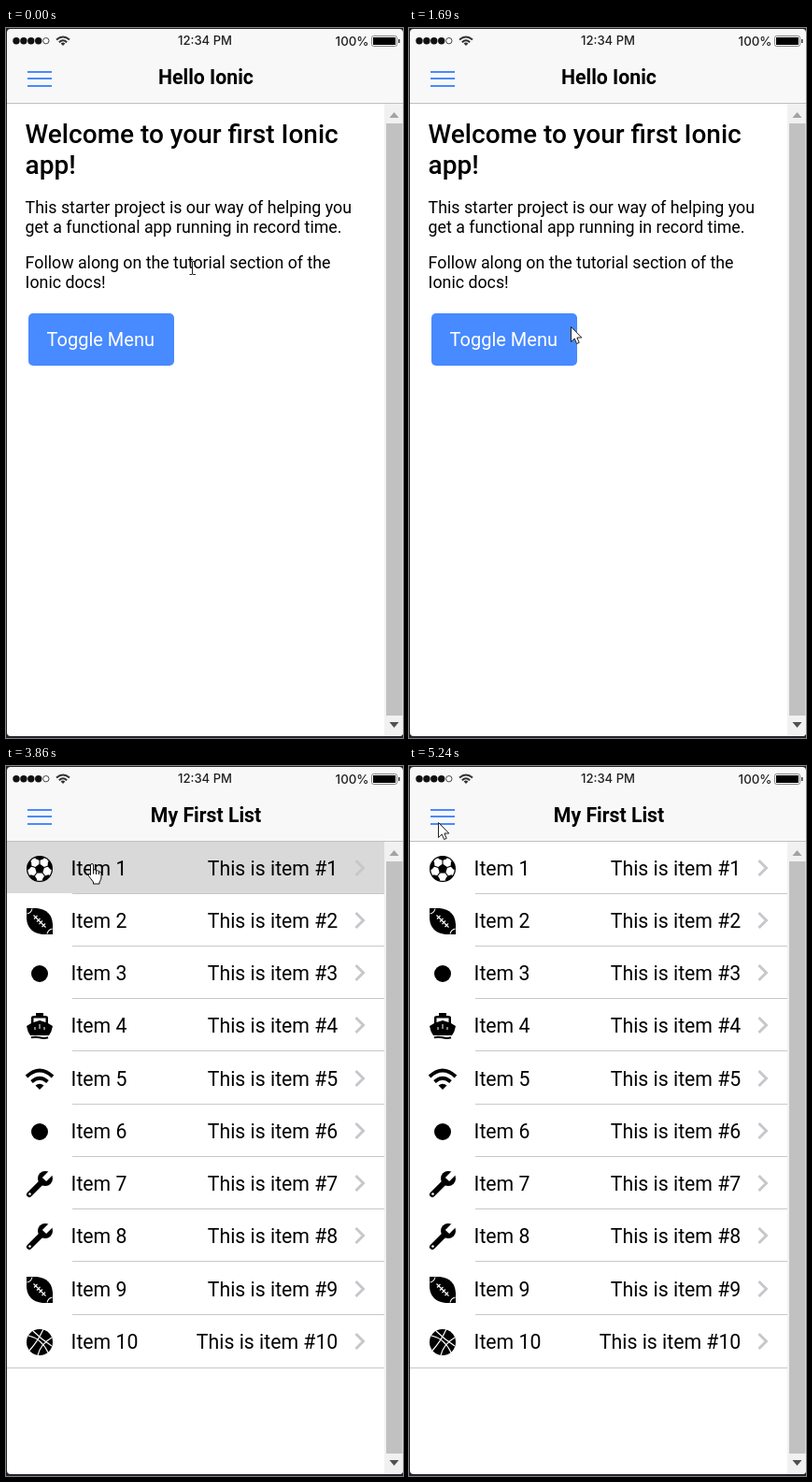
An HTML page with a canvas for the animation above (5320 ms loop, 425 by 759 pixels).

```html
<!DOCTYPE html>
<html lang="en">
<head>
<meta charset="utf-8">
<title>App menu and list</title>
<style>
html, body { margin: 0; width: 100%; height: 100%; overflow: hidden; background: #25222b; }
canvas { display: block; }
</style>
</head>
<body>
<canvas id="stage" width="425" height="759"></canvas>
<script>
const c = document.getElementById('stage').getContext('2d');
const LOOP = 5320, STEP = 77.1, BLUE = '#488aff', LINE = '#c8c7cc';

// CSS-style cubic bezier easing, solved by bisection
function bezier(x1, y1, x2, y2) {
  const at = (a, b, s) => 3 * s * (1 - s) ** 2 * a + 3 * s * s * (1 - s) * b + s ** 3;
  return x => {
    if (x <= 0) return 0;
    if (x >= 1) return 1;
    let lo = 0, hi = 1;
    for (let i = 0; i < 24; i++) {
      const mid = (lo + hi) / 2;
      if (at(x1, x2, mid) < x) lo = mid; else hi = mid;
    }
    return at(y1, y2, lo);
  };
}
const ease = bezier(.25, .1, .25, 1), navEase = bezier(.36, .66, .04, 1);

function text(str, x, y, size, weight = 400, color = '#000', align = 'left', font = 'Roboto') {
  c.font = `${weight} ${size}px ${font}, sans-serif`;
  c.fillStyle = color;
  c.textAlign = align;
  c.fillText(str, x, y);
}
function rect(x, y, w, h, color) {
  c.fillStyle = color;
  c.fillRect(x, y, w, h);
}
function shape(d, fill, stroke, width = 1) {
  const p = new Path2D(d);
  if (fill) { c.fillStyle = fill; c.fill(p); }
  if (stroke) { c.strokeStyle = stroke; c.lineWidth = width; c.stroke(p); }
}
function disc(x, y, r, color) {
  c.beginPath();
  c.arc(x, y, r, 0, 7);
  c.fillStyle = color;
  c.fill();
}
function at(x, y, draw, alpha = 1) {
  c.save();
  c.translate(x, y);
  c.globalAlpha *= alpha;
  draw();
  c.restore();
}

// Icons, centred on the origin
const icons = {
  soccer() {
    disc(0, 0, 14, '#000');
    disc(0, 0, 12.7, '#fff');
    shape('M0 -5.4L5.1 -1.7L3.2 4.4H-3.2L-5.1 -1.7Z', '#000');
    c.beginPath();
    c.arc(0, 0, 13.5, 0, 7);
    c.clip();
    for (let i = 0; i < 5; i++) {
      shape('M0 -9L4.4 -10.8L5 -14H-5L-4.4 -10.8Z', '#000');
      shape('M0 -5V-9.5', null, '#000', 1.1);
      c.rotate(Math.PI * .4);
    }
  },
  football() {
    shape('M-14 -14H-3Q13 -12 14 3V14H3Q-13 12 -14 -3Z', '#000');
    shape('M-6.5 -6.5L6.5 6.5M-6 -2.5L-2.5 -6M-3 .5L.5 -3M-.5 3L3 -.5M2.5 6L6 2.5M-13.5 -8Q-9 -9 -8 -13.5M13.5 8Q9 9 8 13.5',
      null, '#fff', 1.1);
  },
  dot() { disc(0, 0, 9, '#000'); },
  boat() {
    shape('M-9 -3V-9Q-9 -11 -6 -11H-4V-14H4V-11H6Q9 -11 9 -9V-3L14 0Q13 6 10 10H-10Q-13 6 -14 0Z', '#000');
    shape('M-6.5 -4V-8.5H6.5V-4L0 -6Z', '#fff');
    shape('M0 -2V3M-5 1V4M5 1V4', null, '#fff');
    shape('M-9 12.3Q-4.5 11 0 12.3Q4.5 13.6 9 12.3', null, '#000', 2);
  },
  wifi() {
    shape('M-14 -3Q0 -16 14 -3M-8.5 2.5Q0 -5 8.5 2.5', null, '#000', 3.8);
    shape('M-4.5 6.5Q0 3 4.5 6.5L0 11Z', '#000');
  },
  wrench() {
    c.lineCap = 'round';
    shape('M-11 11L4 -4', null, '#000', 6);
    disc(6, -6, 8, '#000');
    c.lineCap = 'butt';
    shape('M5 -5L15 -15', null, '#fff', 6);
    disc(-10.5, 10.5, 1.3, '#fff');
  },
  basketball() {
    disc(0, 0, 14, '#000');
    shape('M-12 -7Q2 -4 9 11M-7 -12Q2 -3 13 4M-11 9Q-2 -1 4 -14M-2 14Q1 2 13 -5', null, '#fff', 1.2);
  }
};
const rows = ['soccer', 'football', 'dot', 'boat', 'wifi', 'dot', 'wrench', 'wrench', 'football', 'basketball'];

function chevron(x, y) {
  at(x, y, () => shape('M-4 -8L4 0L-4 8', null, '#c7c7cc', 3));
}
function scrollbar(x) {
  rect(x, 81, 20, 676, '#f1f1f1');
  rect(x + 2, 102, 17.5, 633, '#c1c1c1');
  at(x + 10.5, 93, () => shape('M-5 3L0 -3L5 3Z', '#a3a3a3'));
  at(x + 10.5, 745, () => shape('M-5 -3L0 3L5 -3Z', '#505050'));
}
function headerBar(width) {
  rect(1, 1, width, 79, '#f8f8f8');
  rect(1, 80, width, 1, '#c0c0c0');
}
function title(str, x) { text(str, x, 60, 21.25, 700, '#000', 'center'); }
function burger() {
  for (const y of [46, 53, 61]) rect(23, y, 26, 2, BLUE);
}

function menu(picked) {
  rect(1, 1, 424, 756, '#fff');
  headerBar(424);
  title('Pages', 166);
  if (picked) rect(1, 135, 310, 55, '#f4f4f4');
  ['Hello Ionic', 'My First List'].forEach((label, i) => {
    text(label, 20.3, 115 + 55 * i, 21.25);
    chevron(284.5, 107.5 + 55 * i);
  });
  rect(21, 134, 290, 1, LINE);
  rect(1, 190, 310, 1, LINE);
  scrollbar(310);
}

function home() {
  rect(1, 81, 424, 676, '#fff');
  text('Welcome to your first Ionic', 20.6, 123, 28, 500);
  text('app!', 20.6, 156, 28, 500);
  const lines = ['This starter project is our way of helping you', 'get a functional app running in record time.',
    'Follow along on the tutorial section of the', 'Ionic docs!'];
  lines.forEach((s, i) => text(s, 20.6, 198 + 21 * i + (i > 1 ? 17 : 0), 17.8));
  c.beginPath();
  c.roundRect(24, 305, 156, 56, 5);
  c.fillStyle = BLUE;
  c.fill();
  text('Toggle Menu', 43.6, 340, 20, 400, '#fff');
  scrollbar(405);
}

function list(pressed) {
  rect(1, 81, 424, 676, '#fff');
  if (pressed) rect(1, 81, 404, 55, '#d9d9d9');
  rows.forEach((icon, i) => {
    const y = 109 + Math.floor(56.25 * i), last = i == rows.length - 1;
    at(36, y + 1, icons[icon]);
    text('Item ' + (i + 1), 69.6, y + 7.5, 21.25);
    text('This is item #' + (i + 1), 355.3, y + 7.5, 21.25, 400, '#000', 'right');
    chevron(378.5, y);
    rect(last ? 1 : 71, last ? 643 : y + 27, 405 - (last ? 1 : 71), 1, LINE);
  });
  scrollbar(405);
}

function details() {
  rect(1, 81, 424, 676, '#fff');
  text('Item 1', 145.5, 130, 28, 500);
  at(247, 118, icons.soccer);
  const lead = 'You navigated here from ';
  text(lead, 28.5, 181, 24.8, 500);
  const w = c.measureText(lead).width;
  text('Item 1', 28.5 + w, 181, 24.8, 700);
  scrollbar(405);
}

// p: 0 shows the list, 1 shows the details
function listAndDetails(p, pressed) {
  const shift = Math.round(424 * (1 - p)), back = Math.round(-140 * p), fade = (1 - p) ** 2;
  at(back, 0, () => list(pressed));
  if (p > 0) {
    rect(1, 81, 424, 676, `rgba(0,0,0,${.2 * p})`);
    at(shift, 0, details);
  }
  headerBar(424);
  at(back, 0, () => title('My First List', 214), fade);
  at(0, 0, burger, fade);
  if (p > 0) {
    at(shift, 0, () => title('Item Details', 214), p);
    at(0, 0, () => {
      shape('M25 41L13 53L25 65', null, BLUE, 3.2);
      text('Back', 35.4 + 125 * (1 - p), 61, 21.25, 400, BLUE);
    }, p);
  }
}

function statusBar() {
  for (let i = 0; i < 4; i++) disc(11 + 7.9 * i, 13.7, 3.7, '#111');
  shape('M46 13.7A3.2 3.2 0 1 1 39.6 13.7A3.2 3.2 0 1 1 46 13.7Z', null, '#333', .9);
  shape('M54 12.5Q61 6.5 68 12.5M56.8 15.2Q61 11.4 65.2 15.2', null, '#333', 2);
  shape('M58.6 16.5Q61 14.6 63.4 16.5L61 19Z', '#333');
  text('12:34 PM', 213, 18, 13.1, 500, '#222', 'center', 'Inter');
  text('100%', 388.5, 18.5, 13.3, 500, '#222', 'right', 'Inter');
  c.beginPath();
  c.roundRect(391.5, 8.5, 27, 11, 2);
  c.strokeStyle = '#888';
  c.lineWidth = 1;
  c.stroke();
  rect(393, 10, 24, 8, '#000');
  rect(420, 12, 1.5, 4, '#333');
}

// Pointer stops: step, x, y
const stops = [[0, 200, 257], [1, 192, 243], [6, 30, 35], [7, 36, 44], [11, 36, 44], [15, 365, 240], [16, 365, 240],
  [22, 173, 319], [25, 118, 337], [28, 118, 337], [31, 99, 227], [34, 61, 142], [43, 61, 142], [48, 90, 104],
  [51, 90, 104], [53, 66, 16], [55, 53, 78], [59, 48, 46], [63, 48, 46], [68, 31, 60], [70, 31, 60]];

function pointer(k) {
  const i = stops.findIndex(s => s[0] > k), [k0, x0, y0] = stops[i - 1], [k1, x1, y1] = stops[i];
  const u = (k - k0) / (k1 - k0);
  at(Math.round(x0 + (x1 - x0) * u), Math.round(y0 + (y1 - y0) * u), () => {
    if (k < 2) {
      shape('M-3.5 -7.5H-1L-.5 -7L0 -7.5H3M-.5 -7V6M-3.5 6.5H-1L-.5 6L0 6.5H3', null, '#222');
    } else if (k > 31 && k < 52) {
      shape('M.5 2Q.5 .5 2 .5Q3.5 .5 3.5 2V7Q6 6 6.5 8Q9 7 9.5 9Q12 8.5 12 11V15Q12 18 10 20V22H3.5V20Q1 17 -1.5 13.5Q-2.5 11 -.5 11L.5 12.5Z',
        '#fff', '#111');
      shape('M3.5 7V11.5M6.5 8V12M9.5 9V12', null, '#111');
    } else {
      shape('M.5 .5V16.5L4.2 13L6.6 18.5L9.2 17.4L6.9 12H11.8Z', '#fff', '#222');
    }
  });
}

function frame(now) {
  const k = Math.min(68, Math.floor((now % LOOP + 10) / STEP)), t = k * STEP;
  const slide = start => ease((t - start) / 280), nav = start => navEase((t - start) / 500);
  const open = slide(602) - slide(1215) + slide(2070) - slide(3055);
  const pushed = nav(3990) - nav(4785);

  rect(0, 0, 425, 759, '#25222b');
  c.save();
  c.beginPath();
  c.roundRect(1, 1, 424, 756, 4);
  c.clip();
  if (open > 0) menu(k >= 38);
  at(Math.round(328 * open), 0, () => {
    if (open > 0) {
      c.shadowColor = 'rgba(0,0,0,.4)';
      c.shadowBlur = 12;
      rect(1, 1, 424, 756, '#fff');
      c.shadowColor = 'transparent';
    }
    if (k < 39) {
      home();
      headerBar(424);
      title('Hello Ionic', 214);
      at(0, 0, burger, k == 7 ? .4 : 1);
    } else {
      listAndDetails(pushed, k >= 50 && k < 60);
    }
  });
  statusBar();
  pointer(k);
  c.restore();
  requestAnimationFrame(frame);
}
requestAnimationFrame(frame);
</script>
</body>
</html>
```
